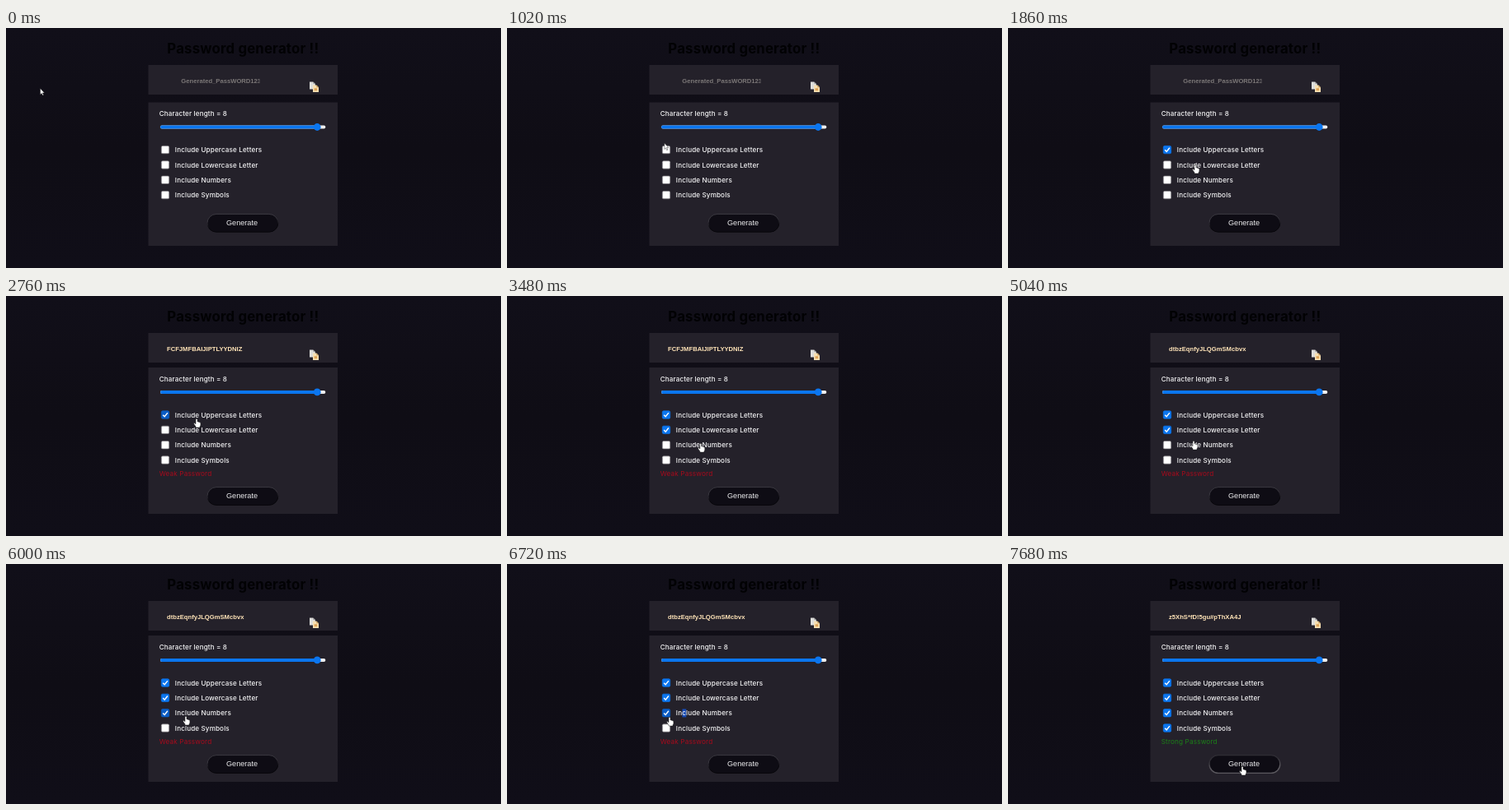
An HTML page for the animation above (8000 ms loop, 600 px wide and 292 px high).

```html
<!DOCTYPE html>
<html lang="en">
<head>
<meta charset="utf-8">
<title>Password generator</title>
<style>
  html, body { margin: 0; width: 100%; height: 100%; overflow: hidden; background: #100e17; }
  svg { display: block; width: 100vw; height: 100vh; }
  text { font-family: Inter, "Open Sans", sans-serif; font-size: 8.1px; font-weight: 500; letter-spacing: .14px; fill: #f6f6f7; }
  .title { font-size: 16.8px; font-weight: 650; letter-spacing: .17px; fill: #020204; }
  .pass { font: bold 7.65px "Liberation Sans", Arial, sans-serif; letter-spacing: 0; fill: #ffe4b8; }
  .hint { fill: #7b7777; }
  .go { font: 9.15px "Liberation Sans", Arial, sans-serif; letter-spacing: 0; fill: #ebebed; }
  .panel { fill: #24212a; }
  .strength { font-weight: 400; font-size: 8.2px; }
</style>
</head>
<body>
<svg viewBox="0 0 600 292" preserveAspectRatio="none">
  <defs>
    <linearGradient id="sky" x1="0" y1="0" x2="0" y2="1">
      <stop offset="0" stop-color="#110f19"/>
      <stop offset=".5" stop-color="#0f0d15"/>
      <stop offset="1" stop-color="#100e18"/>
    </linearGradient>
    <linearGradient id="raised" x1=".4" y1="0" x2=".6" y2="1">
      <stop offset=".3" stop-color="#3b3941"/>
      <stop offset=".7" stop-color="#060509"/>
    </linearGradient>
    <linearGradient id="sunken" x1=".4" y1="0" x2=".6" y2="1">
      <stop offset=".25" stop-color="#2f2d34"/>
      <stop offset=".7" stop-color="#5b595f"/>
    </linearGradient>
    <clipPath id="field"><rect x="195" y="55" width="112.5" height="18"/></clipPath>
  </defs>
  <rect width="600" height="292" fill="url(#sky)"/>
  <text class="title" x="287.3" y="30.5" text-anchor="middle">Password generator !!</text>

  <rect class="panel" x="172.5" y="45" width="229.5" height="36"/>
  <g clip-path="url(#field)"><text id="pass" class="pass" y="66.5"></text></g>
  <g>
    <path d="M368 65.5h4.2l2.6 2.6v6.4H368z" fill="#dededb"/>
    <path d="M372.2 65.5v2.6h2.6z" fill="#a9a9a8"/>
    <path d="M372 69.6h4.4l2.6 2.6v5.8H372z" fill="#f6dfb2"/>
    <path d="M376.4 69.6v2.6h2.6z" fill="#c99c59"/>
    <rect x="373.6" y="73.2" width="3.6" height="3" fill="#dfa557"/>
  </g>

  <rect id="panel" class="panel" x="172.5" width="229.5"/>
  <g id="form">
    <text x="185.7" y="107.2">Character length = 8</text>
    <rect x="187" y="118.5" width="200.3" height="4" rx="2" fill="#efefef"/>
    <rect x="187" y="118.5" width="191" height="4" rx="2" fill="#0b76ef"/>
    <circle cx="377.2" cy="120.5" r="4.4" fill="#0b76ef"/>
    <rect id="mark" x="212.5" y="180" width="4.8" height="10" fill="#174bb5"/>
    <g id="rows"></g>
  </g>
  <text id="strength" class="strength" x="185.7" y="219.2"></text>
  <g id="button">
    <rect id="rim" x="244" y="226.4" width="85.8" height="21.8" rx="10.9" fill="#0e0c14"/>
    <text class="go" x="286" y="240" text-anchor="middle">Generate</text>
  </g>

  <path id="arrow" d="M0 0V7.4L1.7 5.9 2.9 8.6 4.1 8.1 2.9 5.4H5.1Z" fill="#fff" stroke="#111" stroke-width=".4"/>
  <path id="hand" d="M-1 .8Q0-.4 1 .8V4Q1.8 3.5 2.4 4.3 3.3 3.9 3.7 4.8 4.9 4.6 4.9 5.8V8Q4.9 9.2 4 9.8V11H-1V9.8L-3.2 6.8Q-3.6 5.4-2.3 5.6L-1 6.8Z" fill="#fff" stroke="#111" stroke-width=".45"/>
</svg>
<script>
const LOOP = 8000, STEP = 60;
const $ = id => document.getElementById(id);
const attr = (el, values) => { for (const k in values) el.setAttribute(k, values[k]); };
const show = (el, on) => el.setAttribute("visibility", on ? "visible" : "hidden");

// label, right edge, time it is ticked
const options = [
  ["Include Uppercase Letters", 310, 1200],
  ["Include Lowercase Letter", 305, 3120],
  ["Include Numbers", 275, 5880],
  ["Include Symbols", 271, 6900]
];

// time, password, strength, colour
const results = [
  [0, "Generated_PassWORD123", "", "none"],
  [2250, "FCFJMFBAIJIPTLYYDNIZ", "Weak Password", "#a80a1c"],
  [3900, "dtbzEqnfyJLQGmSMcbvx", "Weak Password", "#a80a1c"],
  [7500, "z5XhS*fD!5gu#pThXA4J", "Strong Password", "#1c8018"]
];

// pointer stops: time, x, y
const route = [
  [0, 41.5, 73.5], [840, 168, 108], [1080, 195, 146], [1260, 195, 148],
  [1560, 250, 200], [1860, 227, 166], [2160, 285, 240], [2340, 285, 240],
  [2760, 231, 149], [2880, 227, 143], [3060, 222, 160], [3360, 224, 165],
  [3780, 279, 236], [4080, 280, 238], [4380, 280, 238], [5040, 225, 176],
  [5580, 225, 176], [5820, 214, 180], [5940, 214, 180], [6150, 234, 205],
  [6360, 212, 188], [6720, 197, 186], [6840, 193, 198], [6960, 193, 198],
  [7200, 256, 225], [7440, 281, 241], [7680, 284, 246], [LOOP, 284, 246]
];

const rowY = i => 148.1 + 18.35 * i;

$("rows").innerHTML = options.map(([label], i) => {
  const y = rowY(i);
  return `<g><rect x="188.3" y="${y - 4.7}" width="9.4" height="9.4" rx="1.5" stroke-width=".7"/>
    <path d="M190.2 ${y + .2}l2 2.1 3.7-4.7" fill="none" stroke="#fff" stroke-width="1.4"/>
    <text x="204.8" y="${y + 3.1}">${label}</text></g>`;
}).join("");
const rows = [...$("rows").children];

function pointerAt(t) {
  const i = Math.max(1, route.findIndex(p => p[0] > t));
  const [t0, x0, y0] = route[i - 1], [t1, x1, y1] = route[i];
  const u = (t - t0) / (t1 - t0), e = u * u * (3 - 2 * u);
  return [x0 + (x1 - x0) * e, y0 + (y1 - y0) * e];
}

function draw(time) {
  const t = Math.floor(time / STEP) * STEP;
  const [x, y] = pointerAt(t);
  const [start, pass, strength, color] = results.filter(r => r[0] <= t).pop();
  const done = start > 0;
  const lift = done ? -3.6 : 0, drop = done ? 6.2 : 0;

  $("pass").textContent = pass;
  attr($("pass"), { x: done ? 195 : 212.3, class: done ? "pass" : "pass hint" });
  $("strength").textContent = strength;
  $("strength").style.fill = color;
  attr($("panel"), { y: done ? 87 : 90.5, height: done ? 178 : 174.5 });
  attr($("form"), { transform: `translate(0 ${lift})` });
  attr($("button"), { transform: `translate(0 ${drop})` });
  show($("mark"), t >= 6240 && t < 7020);

  let overLabel = false;
  options.forEach(([, right, at], i) => {
    const on = t >= at, dy = Math.abs(y - rowY(i) - lift);
    const over = x >= 187 && x <= right && dy < 6.5;
    overLabel = overLabel || over;
    const [box, tick] = rows[i].children;
    const blue = over ? "#0a5cc4" : "#0b76ef";
    attr(box, { fill: on ? blue : "#fff", stroke: on ? blue : "#77757a" });
    show(tick, on);
  });

  const overButton = x > 244 && x < 330 && y > 226 + drop && y < 248 + drop;
  attr($("rim"), {
    stroke: `url(#${overButton ? "sunken" : "raised"})`,
    "stroke-width": overButton ? 1.3 : 1
  });

  const hand = overLabel || overButton;
  show($("hand"), hand);
  show($("arrow"), !hand);
  attr($(hand ? "hand" : "arrow"), { transform: `translate(${x.toFixed(2)} ${y.toFixed(2)})` });
}

const begin = performance.now();
function tick() {
  draw((performance.now() - begin) % LOOP);
  requestAnimationFrame(tick);
}
tick();
</script>
</body>
</html>
```
